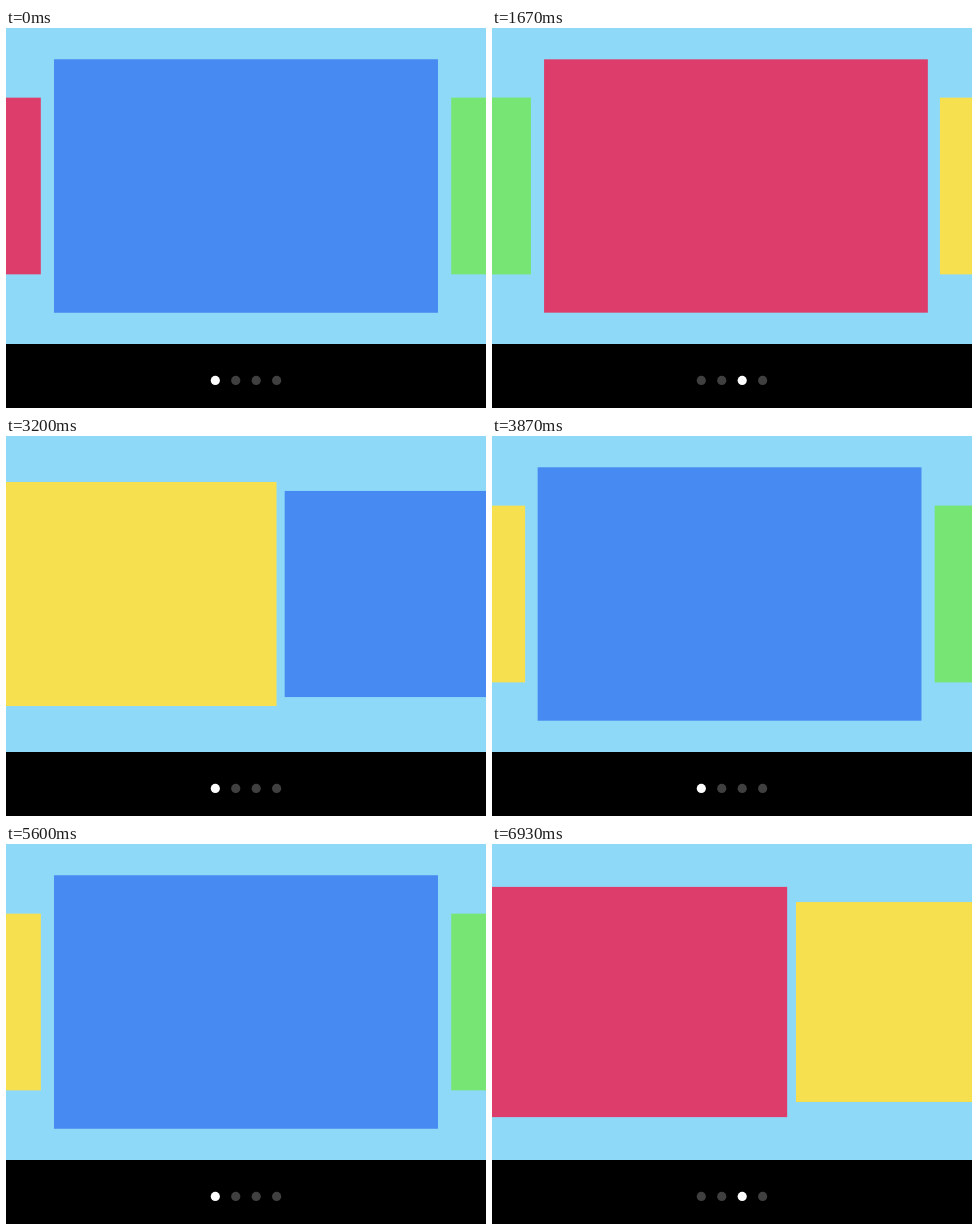
Animation of 480x380 px, one loop 6.99 s. Source, as an HTML page with a canvas:

```html
<!DOCTYPE html>
<html>
<head>
<meta charset="utf-8">
<title>Carousel</title>
<style>
html, body { margin: 0; width: 100%; height: 100%; overflow: hidden; background: #000; }
canvas { display: block; }
</style>
</head>
<body>
<canvas id="stage" width="480" height="380"></canvas>
<script>
const ctx = document.getElementById('stage').getContext('2d');
const LOOP = 6990;
const COLORS = ['#478bf2', '#77e574', '#dd3d6b', '#f6e050'];
const WIDTH = 384, HEIGHT = 253.5, MID_X = 240, MID_Y = 158;
const PITCH = 339, MIN_SCALE = 0.697;

// Each swipe: start ms, duration ms, direction
const SWIPES = [
  [20, 900, 1], [860, 990, 1], [1740, 1238, 1], [2920, 790, 1],
  [3835, 850, 1], [4620, 950, -1], [5610, 800, -1], [6410, 1095, -1]
];

const clamp = v => Math.min(1, Math.max(0, v));
const ease = u => 1 - (1 - u * u) ** 4;

// Distance from the middle; cards outside the three slots move slower
function offset(p) {
  const a = Math.abs(p);
  const x = a < 1 ? PITCH * a - 2.7 * Math.sin(Math.PI * a) ** 2
                  : PITCH + PITCH * MIN_SCALE * (a - 1);
  return Math.sign(p) * x;
}

function scale(p) {
  const a = clamp(Math.abs(p));
  const drop = 0.15 * a + 0.85 * a * a * (3 - 2 * a);
  return 1 - (1 - MIN_SCALE) * drop;
}

// The card before the first one is red
const colorOf = i => i < 0 ? COLORS[2] : COLORS[i % 4];

function drawCard(i, p) {
  const s = scale(p), w = WIDTH * s, h = HEIGHT * s;
  ctx.fillStyle = colorOf(i);
  ctx.fillRect(MID_X + offset(p) - w / 2, MID_Y - h / 2, w, h);
}

function drawDot(i, active) {
  ctx.fillStyle = active ? '#fff' : '#404040';
  ctx.beginPath();
  ctx.arc(209.3 + 20.45 * i, 352.4, 4.6, 0, 2 * Math.PI);
  ctx.fill();
}

function draw(t) {
  let pos = 0, page = 0;
  for (const [start, duration, dir] of SWIPES) {
    const u = clamp((t - start) / duration);
    pos += dir * ease(u);
    if (u > 0.25) page += dir;
  }
  ctx.fillStyle = '#000';
  ctx.fillRect(0, 0, 480, 380);
  ctx.fillStyle = '#8fd9f8';
  ctx.fillRect(0, 0, 480, 316);
  const near = Math.round(pos);
  for (let i = near - 2; i <= near + 2; i++) drawCard(i, i - pos);
  for (let i = 0; i < 4; i++) drawDot(i, i === page % 4);
}

const origin = performance.now();
function tick() {
  draw((performance.now() - origin) % LOOP);
  requestAnimationFrame(tick);
}
tick();
</script>
</body>
</html>
```
